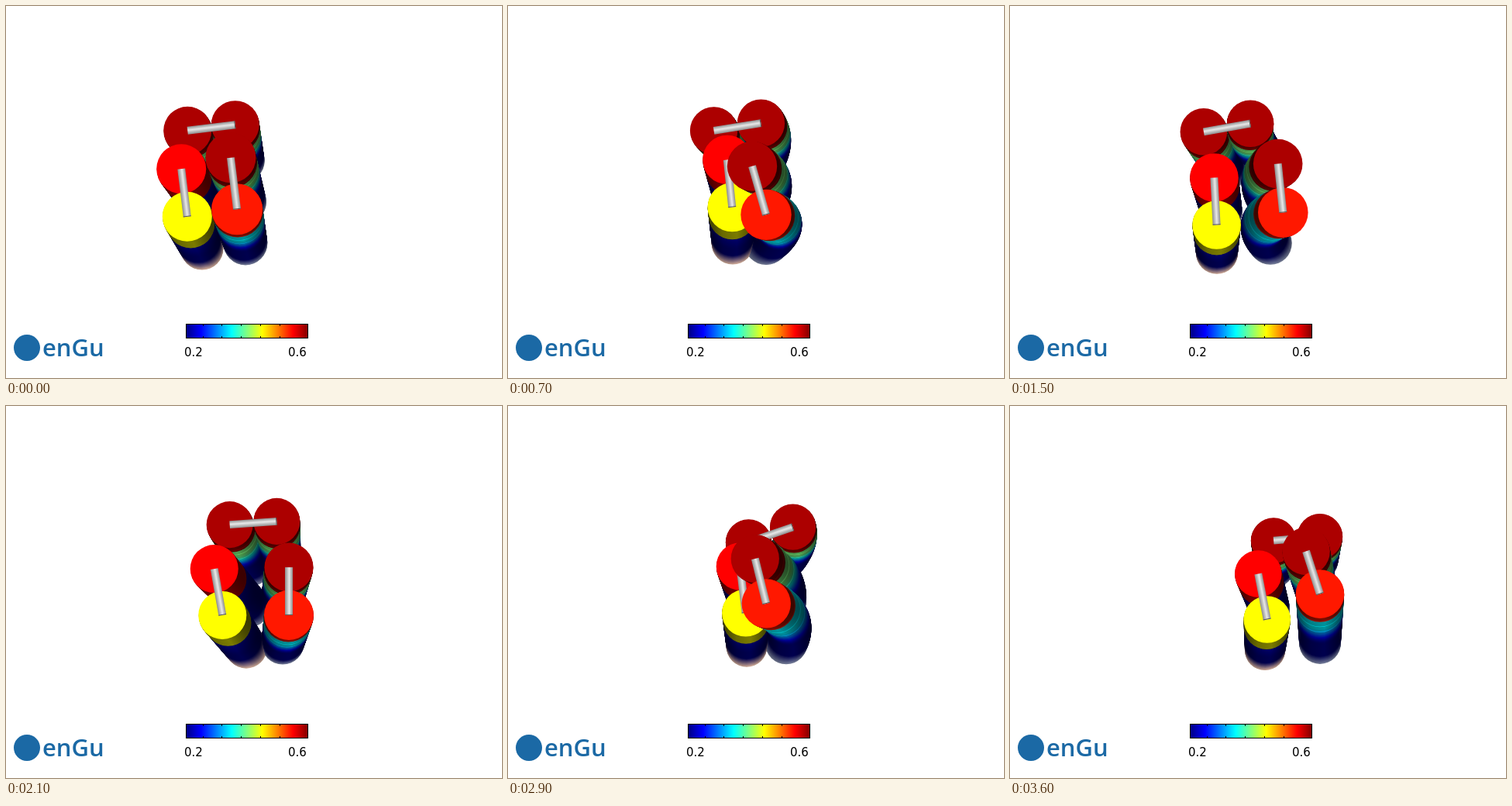
Animation of 640x480 px, one loop 3700 ms. Source, as an HTML page with a canvas:

```html
<!DOCTYPE html>
<html lang="en">
<head>
<meta charset="utf-8">
<title>Helix bundle</title>
<style>
html, body { margin: 0; width: 640px; height: 480px; overflow: hidden; background: #fff; }
canvas { display: block; }
</style>
</head>
<body>
<canvas id="stage" width="640" height="480"></canvas>
<script>
const ctx = document.getElementById('stage').getContext('2d');
const LOOP = 3700, STEP = 100, LEVELS = 72, NEAR = 58, FOOT_GAP = 53;

// Key poses: each linked pair of rods as [centre x, centre y, angle in degrees],
// the x of the two front feet, and the sideways bend of the right column.
const poses = [
  { t: 0, back: [265, 157, -7], left: [230, 241, 83], right: [294, 229, 83], feet: [253, 309], bend: [0] },
  { t: 700, back: [296, 156, -9], left: [286, 229, 84], right: [324, 238, 74], feet: [290, 333], bend: [16] },
  { t: 1500, back: [280, 157, -10], left: [265, 252, 87], right: [349, 235, 84], feet: [267, 336], bend: [-16] },
  { t: 2100, back: [319, 151, -4], left: [274, 240, 80], right: [365, 239, 90], feet: [310, 357], bend: [0] },
  { t: 2500, back: [345, 154, -5], left: [312, 237, 93], right: [371, 224, 82], feet: [333, 371], bend: [6] },
  { t: 2900, back: [339, 166, -19], left: [303, 237, 83], right: [326, 226, 76], feet: [308, 359], bend: [14] },
  { t: 3600, back: [370, 171, -5], left: [326, 246, 79], right: [391, 215, 72], feet: [329, 400], bend: [0] }
];

// col and row give a rod's place in the bundle; value colours the lid,
// mid the side below the cap, and cap is where the lid colour begins.
const darkRed = { value: .956, mid: .5, cap: .88 };
const pairs = [
  { name: 'back', span: 62, shrink: 2, rods: [
    { ...darkRed, col: 0, row: 2, r: 31 },
    { ...darkRed, col: 1, row: 2, r: 31 }] },
  { name: 'left', span: 62, shrink: 2, rods: [
    { value: .875, mid: .04, cap: .73, col: 0, row: 1, r: 32 },
    { value: .625, mid: .04, cap: .76, col: 0, row: 0, r: 32, warm: true }] },
  { name: 'right', span: 67, shrink: 9, rods: [
    { ...darkRed, col: 1, row: 1, r: 32.5 },
    { value: .851, mid: .36, cap: .91, col: 1, row: 0, r: 33 }] }
];
const rods = pairs.flatMap(pair => pair.rods);

const clamp = v => Math.max(0, Math.min(1, v));
const mix = (a, b, k) => a + (b - a) * k;
const smooth = k => k * k * (3 - 2 * k);
const css = rgb => `rgb(${rgb.map(Math.round).join()})`;
const jet = v => [3, 2, 1].map(c => 255 * clamp(1.5 - Math.abs(4 * v - c)));

function sideColour(rod, u, n) {
  const v = u > rod.cap ? rod.value : rod.mid * smooth(clamp((u - .42) / .36));
  const seam = rod.mid > .1 && u > .6 && n % 8 === 2 ? 1.4 : 1;
  const light = (u > rod.cap ? .46 : .58) * seam;
  const haze = rod.warm ? [200, 164, 146] : [112, 120, 146];
  const fade = clamp(1 - u / (rod.warm ? .26 : .16));
  return jet(v).map((c, i) => mix(c * light, haze[i], fade));
}

function shade(rgb, u) {
  const g = ctx.createLinearGradient(-1, 0, 1, 0);
  const dim = mix(.8, .5, clamp(u * 4));
  [[0, dim], [.3, .9], [.6, 1.05], [1, dim]].forEach(([at, k]) => g.addColorStop(at, css(rgb.map(c => c * k))));
  return g;
}

for (const rod of rods) {
  rod.lid = css(jet(rod.value));
  rod.fills = Array.from({ length: LEVELS }, (_, n) => shade(sideColour(rod, n / LEVELS, n), n / LEVELS));
}

function poseAt(t) {
  const i = Math.max(1, poses.findIndex(p => p.t >= t));
  const a = poses[i - 1], b = poses[i];
  const k = smooth((t - a.t) / (b.t - a.t));
  const blend = key => a[key].map((v, n) => mix(v, b[key][n], k));
  return Object.fromEntries(['back', 'left', 'right', 'feet', 'bend'].map(key => [key, blend(key)]));
}

const bump = (t, mid, half) => Math.max(0, 1 - ((t - mid) / half) ** 2) ** 2;
const sway = t => 65 * bump(t, 350, 350) + 22 * bump(t, 2700, 200) - 73 * bump(t, 3250, 350);

// Lid centres of a linked pair, which turns about its middle
function lids(pair, pose, t) {
  const [x, y, angle] = pose[pair.name];
  const half = (pair.span - pair.shrink * t / 3600) / 2;
  const a = angle * Math.PI / 180;
  return [-half, half].map(d => [x + sway(t) + d * Math.cos(a), y + d * Math.sin(a)]);
}

// Path of a rod's axis: u = 0 at the foot, 1 at the lid
function axis(rod, top, pose, frontY, t) {
  const [left, right] = pose.feet;
  const footX = (rod.col ? right : mix(left, right, rod.row * .1)) + sway(t) * .45 - rod.row;
  const footY = (rod.col ? 306 : 312 + .55 * (frontY - 270)) - rod.row * FOOT_GAP;
  const bend = rod.col * pose.bend[0] * (1 - rod.row * .25);
  const r = rod.r - 1.7 * t / 3600;
  return u => {
    const arc = 4 * u * (1 - u);
    return [
      mix(footX, top[0], u) + arc * bend,
      mix(footY, top[1], u) - arc * Math.abs(bend) * .3,
      r * mix(.86, 1, u)
    ];
  };
}

function disc(x, y, r, fill) {
  ctx.save();
  ctx.translate(x, y);
  ctx.scale(r, r);
  ctx.beginPath();
  ctx.arc(0, 0, 1, 0, 2 * Math.PI);
  ctx.fillStyle = fill;
  ctx.fill();
  ctx.restore();
}

function bar([x0, y0], [x1, y1]) {
  const len = Math.hypot(x1 - x0, y1 - y0);
  ctx.save();
  ctx.translate(x0, y0);
  ctx.rotate(Math.atan2(y1 - y0, x1 - x0));
  const g = ctx.createLinearGradient(0, -5, 0, 5);
  [[0, '#8c8c8c'], [.45, '#e8e8e8'], [1, '#8c8c8c']].forEach(s => g.addColorStop(...s));
  ctx.fillStyle = g;
  ctx.fillRect(0, -5, len, 10);
  ctx.fillStyle = '#555';
  ctx.fillRect(len - 1, -5, 1, 10);
  ctx.restore();
}

function legend() {
  const g = ctx.createLinearGradient(232, 0, 390, 0);
  for (let i = 0; i <= 16; i++) g.addColorStop(i / 16, css(jet(i / 16)));
  ctx.fillStyle = g;
  ctx.fillRect(232, 410, 158, 19);
  ctx.strokeStyle = '#000';
  ctx.lineWidth = 1;
  ctx.strokeRect(232.5, 410.5, 157, 18);
  ctx.fillStyle = '#000';
  for (let i = 0; i < 5; i++) {
    const x = Math.round(253.5 + i * 24.8);
    ctx.fillRect(x, 411, 1, 2);
    ctx.fillRect(x, 426, 1, 2);
  }
  ctx.font = '15px "DejaVu Sans", sans-serif';
  ctx.fillText('0.2', 230, 452);
  ctx.fillText('0.6', 364, 452);
}

function badge() {
  const blue = '#1b69a5';
  disc(27, 441, 17, blue);
  ctx.fillStyle = blue;
  ctx.font = '600 31px "Open Sans", sans-serif';
  ctx.fillText('enGu', 47, 452);
}

function draw(t) {
  ctx.fillStyle = '#fff';
  ctx.fillRect(0, 0, 640, 480);
  const pose = poseAt(t);
  const tops = pairs.map(pair => lids(pair, pose, t));
  const frontY = tops[1][1][1];
  const paths = rods.map((rod, i) => axis(rod, tops[i >> 1][i % 2], pose, frontY, t));
  const slice = (i, n) => disc(...paths[i](n / LEVELS), rods[i].fills[n]);

  for (let n = 0; n < NEAR; n++) rods.forEach((_, i) => slice(i, n));
  rods.forEach((rod, i) => {
    for (let n = NEAR; n < LEVELS; n++) slice(i, n);
    disc(...paths[i](1), rod.lid);
    if (i % 2) bar(...tops[i >> 1]);
  });
  legend();
  badge();
}

const start = performance.now();
function tick() {
  const t = (performance.now() - start) % LOOP;
  draw(Math.floor(t / STEP) * STEP);
  requestAnimationFrame(tick);
}
tick();
</script>
</body>
</html>
```
